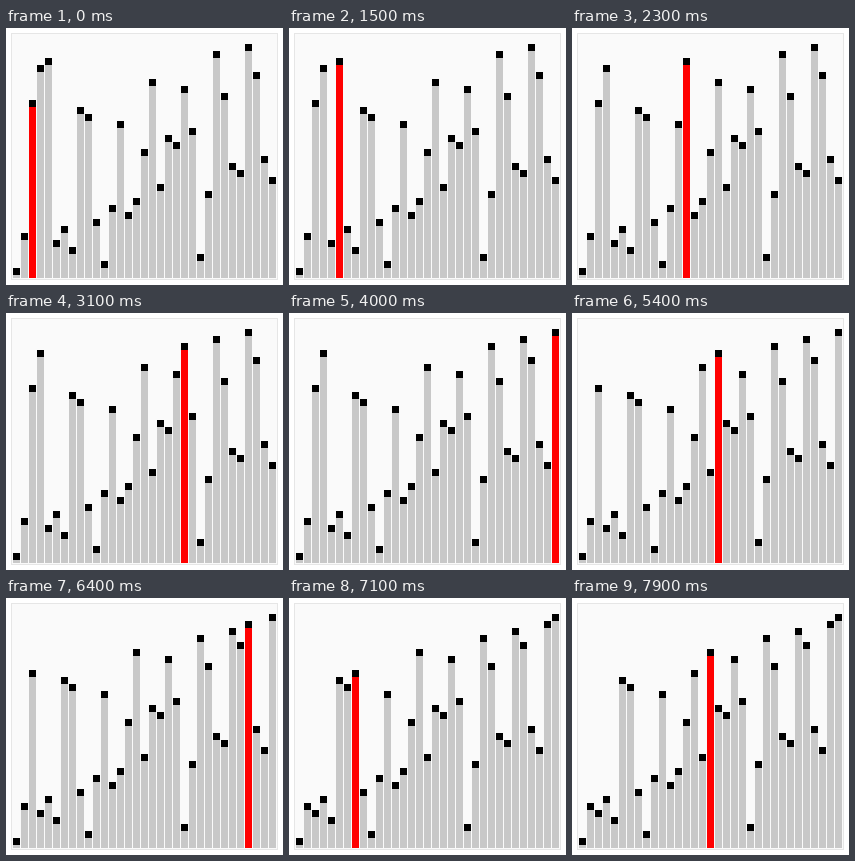
Animation of 277x257 px, one loop 8000 ms. Source, as a matplotlib script:

```python
import matplotlib.pyplot as plt
from matplotlib.animation import FuncAnimation
from matplotlib.patches import Rectangle

W, H, DPI = 277, 257, 64
STEP_MS, FRAMES, HOLD = 100, 80, 15
LEFT, BASE, PITCH, SIZE = 7, 250, 8, 7
GREY, RED = "#c8c8c8", "#ff0000"

START = [1, 6, 25, 30, 31, 5, 7, 4, 24, 23, 8, 2, 10, 22, 9, 11, 18, 28, 13,
         20, 19, 27, 21, 3, 12, 32, 26, 16, 15, 33, 29, 17, 14]


def bubble_swaps(values):
    """Yield the list and the larger item's index after every swap."""
    values = list(values)
    for end in range(len(values) - 1, 0, -1):
        for i in range(end):
            if values[i] > values[i + 1]:
                values[i], values[i + 1] = values[i + 1], values[i]
                yield list(values), i + 1


states = [(START, 2)] + list(bubble_swaps(START))

fig = plt.figure(figsize=(W / DPI, H / DPI), dpi=DPI, facecolor="white")
ax = fig.add_axes([0, 0, 1, 1])
ax.set_xlim(0, W)
ax.set_ylim(H, 0)
ax.axis("off")


def box(x, y, w, h, color):
    return ax.add_patch(Rectangle((x, y), w, h, facecolor=color,
                                  linewidth=0, antialiased=False))


box(5, 5, 267, 247, "#e6e6e6")
box(6, 6, 265, 245, "#fafafa")
columns = [LEFT + PITCH * i for i in range(len(START))]
bars = [box(x, BASE, SIZE, 0, GREY) for x in columns]
caps = [box(x, BASE, SIZE, SIZE, "black") for x in columns]


def draw(frame):
    values, active = states[max(0, frame - HOLD + 1)]
    for i, (value, bar, cap) in enumerate(zip(values, bars, caps)):
        top = BASE - 3 - SIZE * value
        cap.set_y(top)
        bar.set_y(top)
        bar.set_height(BASE - top)
        bar.set_facecolor(RED if i == active else GREY)
    return bars + caps


anim = FuncAnimation(fig, draw, frames=FRAMES, interval=STEP_MS,
                     init_func=lambda: draw(0), repeat=True, repeat_delay=0)
plt.show()
```
